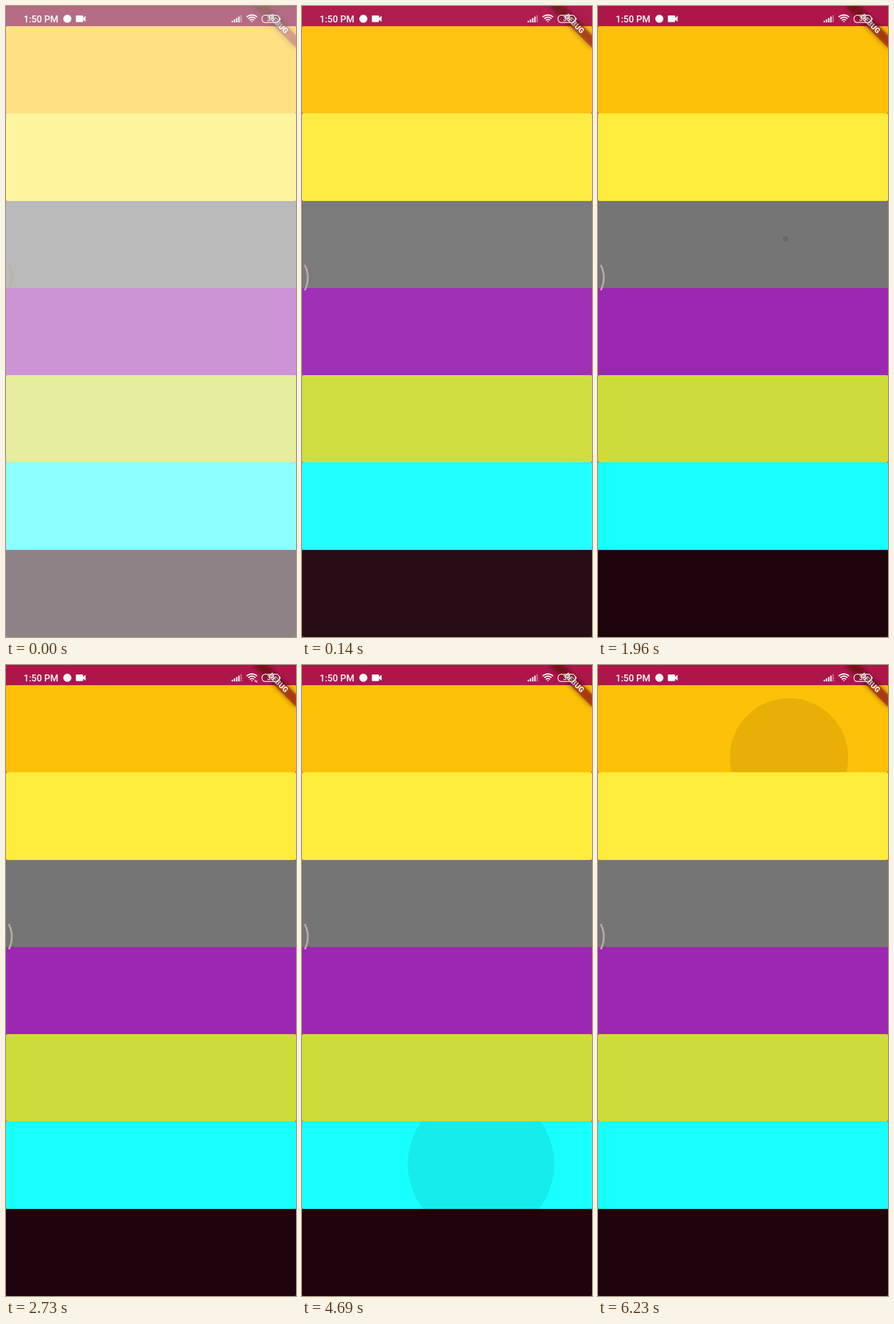
Recreate the animation shown at these times as an HTML page with a canvas. Size 461 by 1000 pixels, loop 6.3 s.

```html
<!DOCTYPE html>
<html lang="en">
<head>
<meta charset="utf-8">
<title>Color bands</title>
<style>
  html, body { margin: 0; width: 100%; height: 100%; overflow: hidden; background: #e91e63; }
  canvas { display: block; }
</style>
</head>
<body>
<canvas id="stage" width="461" height="1000"></canvas>
<script>
const ctx = document.getElementById('stage').getContext('2d');
const W = 461, H = 1000, BAR = 32;
const DP = W / 393;               // pixels per logical unit
const LOOP = 6300, STEP = 70;
const BANDS = ['#ffc107', '#ffeb3b', '#757575', '#9c27b0', '#cddc39', '#18ffff', 'rgba(0,0,0,.87)'];
const FADE_IN = [.5, .2, .04, .015];   // white wash at the start of the loop

// band: index from the top; x, y: touch point; press: ms held before release
const TAPS = [
  { band: 0, x: 300, y: 110, start: 1250, press: 80 },
  { band: 1, x: 300, y: 240, start: 1470, press: 60 },
  { band: 2, x: 299, y: 369, start: 1946, press: 130 },
  { band: 3, x: 305, y: 510, start: 2440, press: 70 },
  { band: 4, x: 305, y: 650, start: 2860, press: 80 },
  { band: 5, x: 305, y: 790, start: 3210, press: 70 },
  { band: 6, x: 310, y: 930, start: 3630, press: 70 },
  { band: 6, x: 310, y: 930, start: 4190, press: 80 },
  { band: 5, x: 315, y: 790, start: 4540, press: 70 },
  { band: 4, x: 330, y: 650, start: 4890, press: 80 },
  { band: 3, x: 365, y: 508, start: 5224, press: 2 },
  { band: 2, x: 345, y: 380, start: 5590, press: 70 },
  { band: 1, x: 335, y: 260, start: 5850, press: 70 },
  { band: 0, x: 330, y: 163, start: 6080, press: 100 }
];

// Band edges sit on whole pixels.
const bandTop = i => Math.round(BAR + i * (H - BAR) / BANDS.length);

function bandPath(i) {
  ctx.beginPath();
  ctx.roundRect(0, bandTop(i), W, bandTop(i + 1) - bandTop(i), 2 * DP);
}

function stroke(color, width, build) {
  ctx.strokeStyle = color;
  ctx.lineWidth = width;
  ctx.beginPath();
  build();
  ctx.stroke();
}

function label(text, x, y, font, align = 'left') {
  ctx.font = font + ' Roboto, sans-serif';
  ctx.textAlign = align;
  ctx.fillText(text, x, y);
}

// Grows slowly while held, then at one logical unit per ms while fading over 200 ms.
function drawRipple({ band, x, y, start, press }, now) {
  const age = now - start, released = Math.max(0, age - press);
  if (age < 0 || released >= 200) return;
  const top = bandTop(band), bottom = bandTop(band + 1);
  const reach = Math.hypot(Math.max(x, W - x), Math.max(y - top, bottom - y));
  const grown = Math.min(1, Math.min(age, press) / 1000 + released * DP / reach);
  const cx = x + (W / 2 - x) * grown;
  const cy = y + ((top + bottom) / 2 - y) * grown;
  ctx.save();
  bandPath(band);
  ctx.clip();
  ctx.fillStyle = `rgba(0,0,0,${.122 * (1 - released / 200)})`;
  ctx.beginPath();
  ctx.arc(cx, cy, reach * grown, 0, 7);
  ctx.fill();
  ctx.restore();
}

function drawBanner() {
  ctx.save();
  ctx.translate(W, 0);
  ctx.rotate(Math.PI / 4);
  ctx.scale(DP, DP);
  ctx.save();
  ctx.filter = 'blur(4.5px)';
  ctx.fillStyle = 'rgba(0,0,0,.5)';
  ctx.fillRect(-40, 28, 80, 12);
  ctx.restore();
  ctx.fillStyle = 'rgba(183,28,28,.627)';
  ctx.fillRect(-40, 28, 80, 12);
  ctx.fillStyle = '#fff';
  label('DEBUG', 0, 37.2, '900 10.2px', 'center');
  ctx.restore();
}

function drawStatus(now) {
  ctx.fillStyle = '#fff';
  label('1:50 PM', 28, 25.5, '500 14.8px');

  ctx.beginPath();
  ctx.arc(97.5, 20.2, 6.4, 0, 7);
  ctx.fill();

  // camera
  ctx.beginPath();
  ctx.roundRect(111, 15, 11.5, 10.5, 1.3);
  ctx.moveTo(121, 20.2);
  ctx.lineTo(126.5, 15.6);
  ctx.lineTo(126.5, 24.9);
  ctx.fill();

  // signal
  for (let i = 0; i < 5; i++) {
    const h = 2.6 + i * 2.2;
    ctx.fillStyle = i < 4 ? '#fff' : 'rgba(255,255,255,.4)';
    ctx.fillRect(358.7 + i * 3.5, 26 - h, 2.1, h);
  }

  // wifi
  for (const radius of [11.8, 8.2, 4.6, 1]) {
    stroke('#fff', 1.9, () => ctx.arc(390.8, 26, radius, -Math.PI * .75, -Math.PI * .25));
  }
  if (now >= 2660 && now < 4200) {
    ctx.fillStyle = '#fff';
    ctx.fillRect(395.4, 23.5, 1.3, 3.5);
    ctx.fillRect(397.8, 24.5, 1.3, 3.5);
  }

  // battery
  stroke('#fff', 1.2, () => ctx.roundRect(407, 14.6, 27.5, 11.6, 5));
  stroke('#fff', 1.2, () => ctx.arc(433.6, 20.4, 2.4, -1, 1));
  ctx.fillStyle = '#fff';
  label('38', 420.8, 24.1, '500 10px', 'center');
}

function drawEdgeHandle(opacity) {
  ctx.lineCap = 'round';
  stroke(`rgba(190,168,172,${opacity})`, 3, () => {
    ctx.moveTo(5, 411.5);
    ctx.quadraticCurveTo(13.5, 430.5, 5, 449.5);
  });
  ctx.lineCap = 'butt';
}

function draw(now) {
  ctx.fillStyle = '#e91e63';
  ctx.fillRect(0, 0, W, H);
  BANDS.forEach((color, i) => {
    ctx.fillStyle = color;
    bandPath(i);
    ctx.fill();
  });
  TAPS.forEach(tap => drawRipple(tap, now));
  drawBanner();

  const wash = FADE_IN[now / STEP] || 0;
  ctx.fillStyle = `rgba(255,255,255,${wash})`;
  ctx.fillRect(0, 0, W, H);

  ctx.fillStyle = 'rgba(0,0,0,.255)';
  ctx.fillRect(0, 0, W, BAR);
  drawStatus(now);
  drawEdgeHandle(1 - wash);
}

function tick() {
  draw(Math.floor(performance.now() % LOOP / STEP) * STEP);
  requestAnimationFrame(tick);
}
tick();
</script>
</body>
</html>
```
